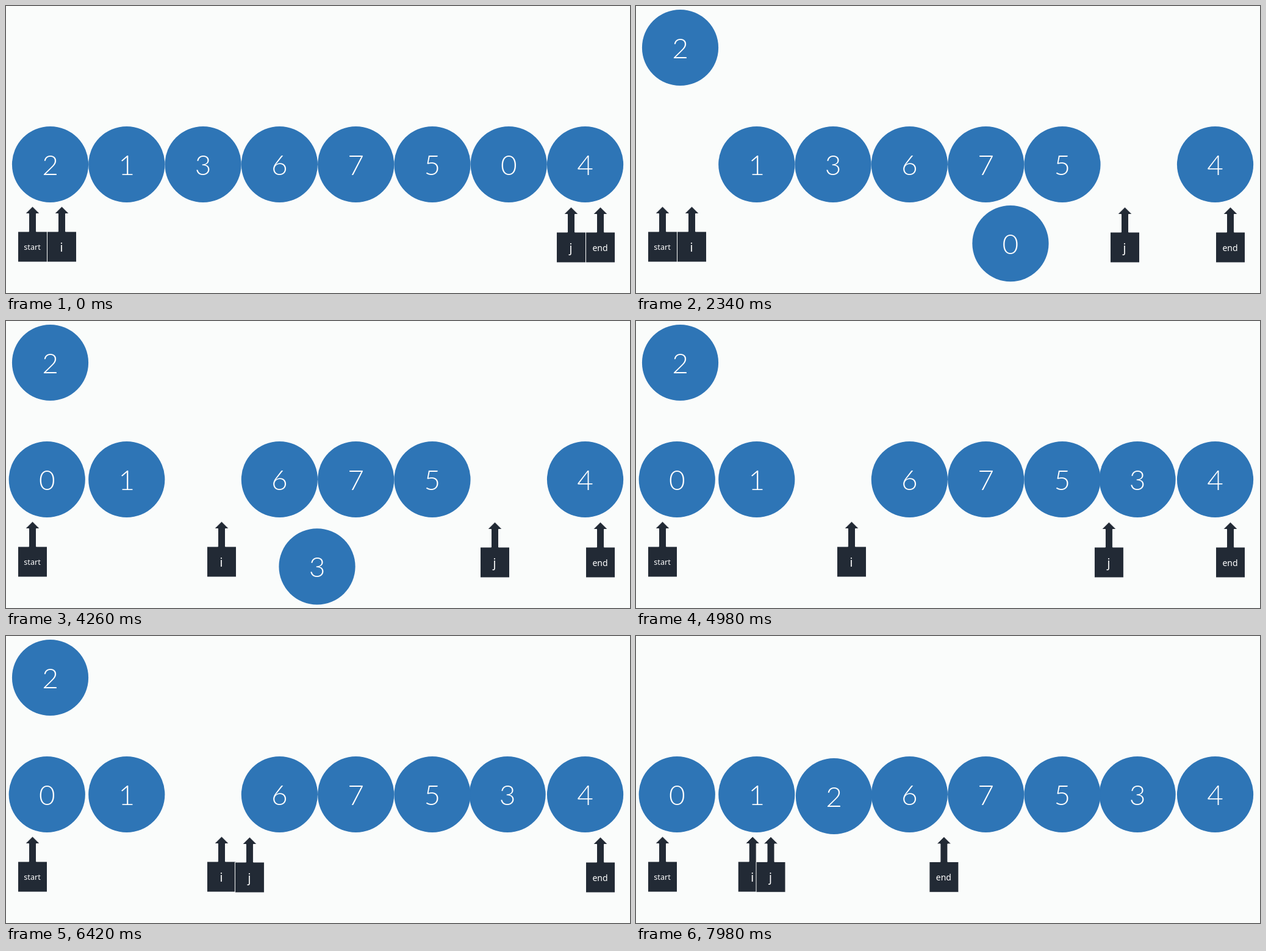
An HTML page for the animation above (8000 ms loop, 1023x472 px).

```html
<!DOCTYPE html>
<html lang="en">
<head>
<meta charset="utf-8">
<title>Quicksort partition</title>
<style>
  html, body { margin: 0; width: 100%; height: 100%; overflow: hidden; background: #fafcfb; }
  svg { display: block; width: 1023px; height: 472px; }
  text { fill: #fff; text-anchor: middle; }
  .ball circle { fill: #2e75b6; }
  .ball text { font: 300 46px Lato, "Noto Sans CJK SC", sans-serif; }
  .pointer path { fill: #222a35; stroke: #fafcfb; stroke-width: 1; }
  .pointer text { font-family: "Noto Sans", "Open Sans", sans-serif; }
</style>
</head>
<body>
<svg id="stage" viewBox="0 0 1023 472"></svg>
<script>
const NS = 'http://www.w3.org/2000/svg';
const LOOP = 8000, HOLD = 540, STEP = 60;
const stage = document.getElementById('stage');
const parts = {};

function add(parent, tag, attrs, text) {
  const el = document.createElementNS(NS, tag);
  for (const key in attrs) el.setAttribute(key, attrs[key]);
  if (text) el.textContent = text;
  return parent.appendChild(el);
}

function addPart(name, cls, x, y) {
  const el = add(stage, 'g', { class: cls });
  parts[name] = { el, x, y, moves: [] };
  return el;
}

[...'21367504'].forEach((digit, k) => {
  const g = addPart(digit, 'ball', 72.5 + 125.29 * k, 260.5);
  add(g, 'circle', { r: 62.6 });
  add(g, 'text', { y: 17.5 }, digit);
});

// Up-arrow callouts, placed by the top left corner of the box
const CALLOUT = 'M-.5 -.5H17.5V-30H11.8L23.5 -41.7L35.2 -30H29.5V-.5H47.5V49.5H-.5Z';
[
  ['start', 20, 371.5, 12.6, 29.5],
  ['i', 68, 371.5, 19, 32.5],
  ['j', 903, 372.5, 19, 32.5],
  ['end', 951, 372.5, 14, 30.5]
].forEach(([name, x, y, size, base]) => {
  const g = addPart(name, 'pointer', x, y);
  add(g, 'path', { d: CALLOUT });
  add(g, 'text', { x: 23, y: base, 'font-size': size }, name);
});

function move(name, start, dur, d) {
  const path = document.createElementNS(NS, 'path');
  path.setAttribute('d', 'M0 0' + d);
  parts[name].moves.push({ start, dur, path, length: path.getTotalLength() });
}
const line = (dx, dy = 0) => `L${dx} ${dy}`;
const dip = dx => `C${dx * .15} 199 ${dx * .85} 199 ${dx} 0`;

const BALL = 930, HOP = 470;
move('2', 490, BALL, line(0, -192));
move('j', 1450, HOP, line(-125));
move('0', 1980, BALL, dip(-757));
move('i', 2915, 455, line(131));
move('i', 3375, 460, line(131));
move('3', 3845, BALL, dip(499));
move('j', 4830, HOP, line(-128));
move('j', 5309, HOP, line(-128));
move('j', 5797, HOP, line(-128));
move('j', 6286, HOP, line(-111));
move('2', 6770, BALL, line(252, 195));
move('i', 7715, HOP, line(-262));
move('j', 7715, HOP, line(-138, -1));
move('end', 7715, HOP, line(-758, -1));

const ease = u => u < .5 ? 2 * u * u : 1 - 2 * (1 - u) ** 2;

function draw(t) {
  for (const { el, x, y, moves } of Object.values(parts)) {
    let px = x, py = y;
    for (const m of moves) {
      const u = Math.min(1, (t - m.start) / m.dur);
      if (u <= 0) break;
      const p = m.path.getPointAtLength(m.length * ease(u));
      px += p.x;
      py += p.y;
    }
    el.setAttribute('transform', `translate(${px.toFixed(2)} ${py.toFixed(2)})`);
  }
}

function tick() {
  const t = performance.now() % LOOP;
  draw(t < HOLD ? 0 : t - (t - HOLD) % STEP);
  requestAnimationFrame(tick);
}
tick();
</script>
</body>
</html>
```
